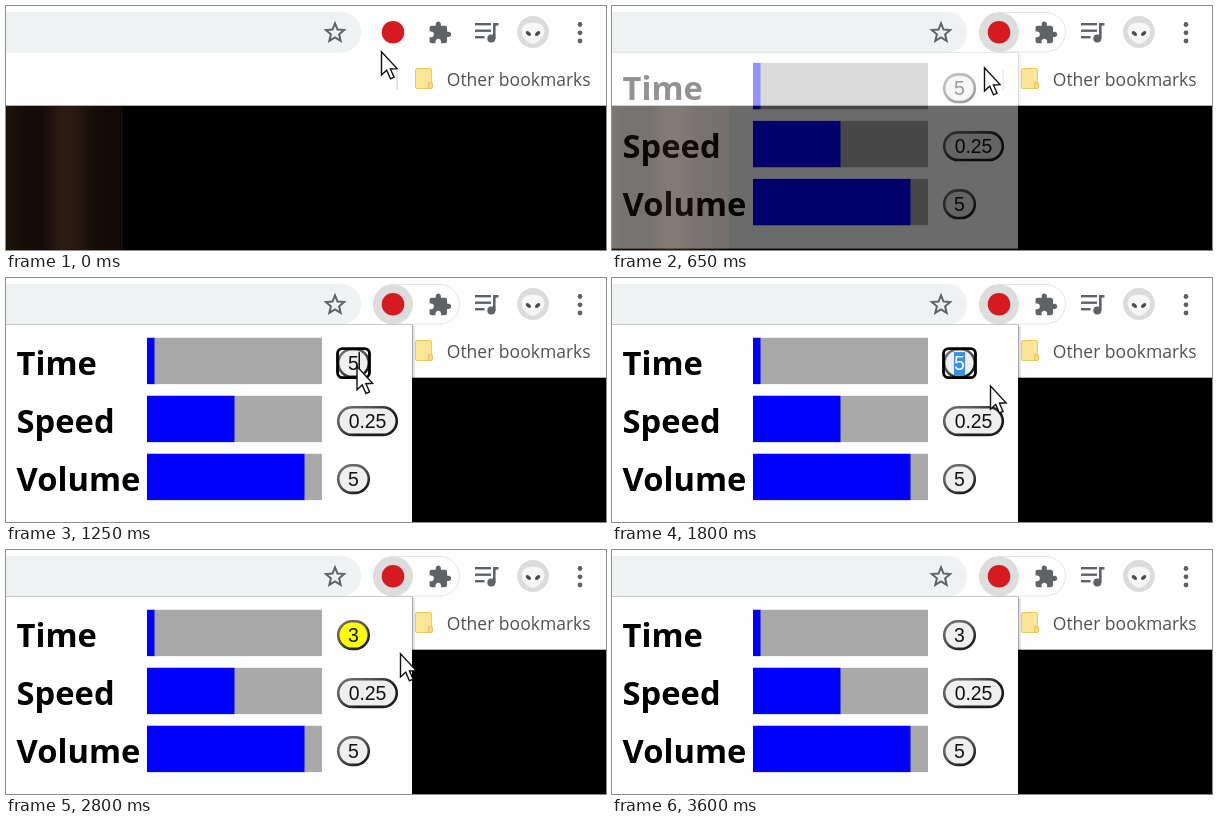
An HTML page with a canvas that plays this animation: 600x244 px, repeating every 3650 ms.

```html
<!DOCTYPE html>
<html lang="en">
<head>
<meta charset="utf-8">
<title>Playback popup</title>
<style>
html, body { margin: 0; width: 100%; height: 100%; overflow: hidden; background: #fff; }
canvas { display: block; width: 600px; height: 244px; }
</style>
</head>
<body>
<canvas id="stage" width="600" height="244"></canvas>
<script>
const W = 600, H = 244, LOOP = 3650, STEP = 50;
const ICON = '#5f6368';
const ctx = document.getElementById('stage').getContext('2d');
const layer = document.createElement('canvas');
layer.width = W;
layer.height = H;
const popupCtx = layer.getContext('2d');

const OPEN = 600, HOVER = 300, FOCUS = 1150, SELECT = 1450, TYPED = 2250;
const FLASH_ON = 2600, FLASH_OFF = 3100;

// time, x, y of the pointer tip
const pointerPath = [
  [0, 375.5, 45.8], [250, 382, 29], [450, 383, 29], [550, 377, 48],
  [650, 372.5, 61.8], [750, 368, 65], [1050, 351, 88.5], [1450, 351, 88.5],
  [1800, 378.5, 108], [2350, 379, 108], [2600, 394.5, 103.8],
  [2850, 394.5, 103.8], [3200, 404, 250]
];

const puzzle = new Path2D('M20.5 11H19V7c0-1.1-.9-2-2-2h-4V3.5C13 2.12 11.88 1 10.5 1S8 2.12 8 3.5V5H4c-1.1 0-2 .9-2 2v3.8h1.5c1.49 0 2.7 1.21 2.7 2.7s-1.21 2.7-2.7 2.7H2V20c0 1.1.9 2 2 2h3.8v-1.5c0-1.49 1.21-2.7 2.7-2.7s2.7 1.21 2.7 2.7V22H17c1.1 0 2-.9 2-2v-4h1.5c1.38 0 2.5-1.12 2.5-2.5S21.88 11 20.5 11z');
const arrow = new Path2D('M0 0V23.2L5.2 18.4L9 27L12.6 25.4L8.9 17.2L15.6 16.8Z');

function rect(c, x, y, w, h, color) {
  c.fillStyle = color;
  c.fillRect(x, y, w, h);
}

function roundRect(c, x, y, w, h, r, fill, stroke, lineWidth = 1) {
  c.beginPath();
  c.roundRect(x, y, w, h, r);
  if (fill) { c.fillStyle = fill; c.fill(); }
  if (stroke) { c.strokeStyle = stroke; c.lineWidth = lineWidth; c.stroke(); }
}

function disc(c, x, y, r, color) {
  c.beginPath();
  c.arc(x, y, r, 0, Math.PI * 2);
  c.fillStyle = color;
  c.fill();
}

function label(c, text, x, y, font, color, align = 'left') {
  c.font = font;
  c.fillStyle = color;
  c.textAlign = align;
  c.fillText(text, x, y);
}

function drawStar(x, y) {
  ctx.beginPath();
  for (let i = 0; i < 10; i++) {
    const r = i % 2 ? 4.3 : 9.6, a = i * Math.PI / 5 - Math.PI / 2;
    ctx.lineTo(x + r * Math.cos(a), y + r * Math.sin(a));
  }
  ctx.closePath();
  ctx.strokeStyle = ICON;
  ctx.lineWidth = 2;
  ctx.stroke();
}

function drawPlaylist() {
  rect(ctx, 469, 17, 16, 2.4, ICON);
  rect(ctx, 469, 23.5, 16, 2.4, ICON);
  rect(ctx, 469, 30, 9.5, 2.4, ICON);
  rect(ctx, 487, 17, 2.6, 16, ICON);
  rect(ctx, 487, 17, 5.5, 2.6, ICON);
  disc(ctx, 485.3, 32.5, 4, ICON);
}

function drawAvatar() {
  disc(ctx, 527, 26, 16, '#dcdcdc');
  ctx.beginPath();
  ctx.moveTo(527, 38);
  ctx.bezierCurveTo(521, 37, 514, 29, 516, 22);
  ctx.bezierCurveTo(518, 15, 536, 15, 538, 22);
  ctx.bezierCurveTo(540, 29, 533, 37, 527, 38);
  ctx.fillStyle = '#f7f7f7';
  ctx.fill();
  ctx.fillStyle = '#4a4a4a';
  for (const side of [-1, 1]) {
    ctx.beginPath();
    ctx.ellipse(527 + side * 4.6, 27.5, 3, 1.8, -side * 0.6, 0, Math.PI * 2);
    ctx.fill();
  }
}

function drawBrowser(t) {
  rect(ctx, 0, 0, W, H, '#fefefe');
  roundRect(ctx, -40, 6, 395, 40.5, 20, '#eef2f2');
  drawStar(329, 27);

  if (t >= HOVER) {
    if (t >= OPEN - 100) roundRect(ctx, 367.5, 6.5, 86, 39.5, 19.75, '#fefefe', '#e3e5e7');
    disc(ctx, 387, 26.3, 20, '#dcdddd');
  }
  disc(ctx, 387, 26.3, 11.3, '#d51a20');

  ctx.save();
  ctx.translate(421.5, 14.5);
  ctx.scale(1.03, 1.03);
  ctx.fillStyle = ICON;
  ctx.fill(puzzle);
  ctx.restore();

  drawPlaylist();
  drawAvatar();
  for (const y of [18.5, 26.8, 35]) disc(ctx, 574, y, 2.4, ICON);

  rect(ctx, 390.5, 64, 1.2, 20, '#d0d2d4');
  roundRect(ctx, 409.5, 62.5, 16, 20, 1, '#fbe596', '#e8ca62');
  roundRect(ctx, 422.5, 76.5, 4, 6, 1, '#f6d978', '#e2c05a');
  label(ctx, 'Other bookmarks', 440.8, 80, '17.5px "Open Sans", sans-serif', '#505356');

  rect(ctx, 0, 99, W, 1, '#b0b0b0');
  rect(ctx, 0, 100, W, H - 100, '#000');
  const curtain = ctx.createLinearGradient(0, 0, 117, 0);
  [[0, '#20150e'], [0.12, '#160e09'], [0.3, '#130c08'], [0.48, '#2c1d13'],
   [0.6, '#281a12'], [0.75, '#150d08'], [1, '#110a06']]
    .forEach(([at, color]) => curtain.addColorStop(at, color));
  rect(ctx, 0, 100, 117, H - 100, curtain);
}

function drawField(c, y, width, text, state) {
  const x = 331, h = 30, cx = x + width / 2, base = y + 22;
  const font = '19.4px "Liberation Sans", Arial, sans-serif';
  const edge = c.createLinearGradient(x, y, x + 20, y + h);
  edge.addColorStop(0, '#777');
  edge.addColorStop(0.55, '#555');
  edge.addColorStop(1, '#1c1c1c');
  const focused = state === 'caret' || state === 'selected';
  const fill = state === 'flash' ? '#ffff00' : '#efefef';

  roundRect(c, x + 1.2, y + 1.2, width - 2.4, h - 2.4, 14, fill, edge, 2.6);
  if (focused) roundRect(c, x + 0.5, y + 0.5, width - 1, h - 1, 5, null, '#000', 2.8);
  if (state === 'selected') rect(c, cx - 5.5, y + 4, 11, 23, '#3390f5');
  label(c, text, cx, base, font, state === 'selected' ? '#fff' : '#111', 'center');
  if (state === 'caret') rect(c, cx + 5, y + 4, 1.4, 23, '#000');
}

function timeState(t) {
  if (t >= FLASH_ON) return t < FLASH_OFF ? 'flash' : 'idle';
  if (t >= TYPED) return 'caret';
  if (t >= SELECT) return 'selected';
  return t >= FOCUS ? 'caret' : 'idle';
}

function drawPopup(t) {
  const c = popupCtx;
  const age = t - OPEN;
  const shown = Math.min(1, 0.175 + age * 0.0049);
  const slide = -4 * Math.max(0, 1 - age / 180);
  const bottom = 245.5 + slide;
  c.clearRect(0, 0, W, H);
  rect(c, 0, 47, 406, bottom - 47, '#fefefe');
  rect(c, 0, 46, 407, 1, '#c8caca');
  rect(c, 406, 47, 1, bottom - 47, 'rgba(0,0,0,.35)');
  rect(c, 407, 48, 2, bottom - 48, 'rgba(0,0,0,.1)');

  c.save();
  c.translate(0, slide);
  const rows = [
    ['Time', 7.5, 33, t >= TYPED ? '3' : '5', timeState(t)],
    ['Speed', 87.5, 61, '0.25', 'idle'],
    ['Volume', 157.5, 33, '5', 'idle']
  ];
  rows.forEach(([name, filled, width, value, state], i) => {
    const y = 59.8 + i * 58;
    label(c, name, 10.6, y + 37.5, 'bold 32.7px "Open Sans", sans-serif', '#000');
    rect(c, 141, y, 175, 46.3, '#a9a9a9');
    rect(c, 141, y, filled, 46.3, '#0000ff');
    drawField(c, y + 10.3, width, value, state);
  });
  c.restore();

  ctx.globalAlpha = shown;
  ctx.drawImage(layer, 0, 0);
  ctx.globalAlpha = 1;
}

function pointerAt(t) {
  const next = pointerPath.findIndex(p => p[0] > t);
  if (next < 0) return null;
  const [t0, x0, y0] = pointerPath[next - 1];
  const [t1, x1, y1] = pointerPath[next];
  const k = (t - t0) / (t1 - t0);
  return [x0 + (x1 - x0) * k, y0 + (y1 - y0) * k];
}

function drawPointer(t) {
  const tip = pointerAt(t);
  if (!tip) return;
  ctx.save();
  ctx.translate(...tip);
  ctx.fillStyle = '#fff';
  ctx.strokeStyle = '#111';
  ctx.lineWidth = 1.4;
  ctx.fill(arrow);
  ctx.stroke(arrow);
  ctx.restore();
}

function render(now) {
  const t = Math.floor(now % LOOP / STEP) * STEP;
  drawBrowser(t);
  if (t >= OPEN) drawPopup(t);
  drawPointer(t);
}

let start;
function tick(now) {
  start ??= now;
  render(now - start);
  requestAnimationFrame(tick);
}
render(0);
requestAnimationFrame(tick);
</script>
</body>
</html>
```
